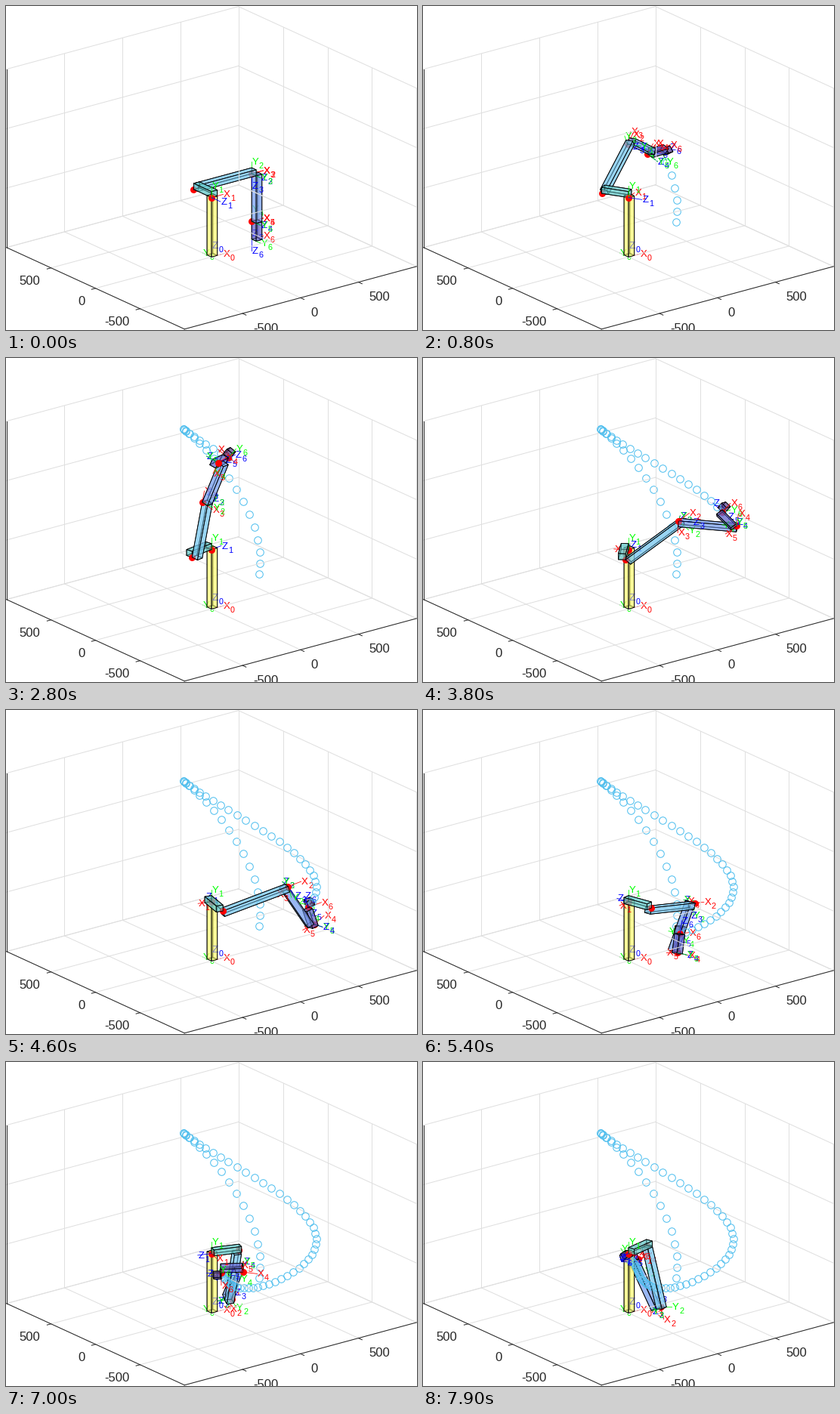
A matplotlib script for the animation above (8 s loop, 544 by 429 pixels).

```python
import colorsys
import itertools
import numpy as np
import matplotlib.pyplot as plt
from matplotlib.animation import FuncAnimation
from matplotlib.patches import Polygon

W, H, DPI = 544, 429, 100
PX = 72 / DPI                      # points per pixel
STEPS, STEP = 80, np.radians(3.6)  # every joint turns by the same angle
FONT = "Liberation Sans"
INK, GRID = "#262626", "#dfdfdf"
COLORS = ["#ff0000", "#00ff00", "#0000ff"]

# Affine view from azimuth -37.5 degrees: pixels and nearness per mm
AZ, TILT, SCALE, RISE = np.radians(37.5), 0.352, 0.1935, 0.1574
C, S = SCALE * np.cos(AZ), SCALE * np.sin(AZ)
VIEW = np.array([[C, -S, 0], [-TILT * S, -TILT * C, -RISE]])
NEAR = np.array([-S, -C, TILT * RISE / (1 - TILT ** 2)])
ORIGIN = np.array([272.0, 332.3])

# Arm dimensions in mm
BASE, OFFSET, UPPER, FORE, TOOL, THICK = 500, 200, 500, 400, 150, 50
POINT_LIFT = 1.2                   # markers and text win over touching faces


def project(p):
    return ORIGIN + np.asarray(p, float) @ VIEW.T


def order(p):
    return 50 + 100 * float(np.mean(np.atleast_2d(p) @ NEAR))


def link(q, d=0, a=0, alpha=0):
    c, s = np.cos(q), np.sin(q)
    ca, sa = np.cos(np.radians(alpha)), np.sin(np.radians(alpha))
    return np.array([[c, -s * ca, s * sa, a * c],
                     [s, c * ca, -c * sa, a * s],
                     [0, sa, ca, d],
                     [0, 0, 0, 1]])


def pose(k):
    q = k * STEP
    chain = [link(q, d=BASE, alpha=90), link(q, d=-OFFSET, a=UPPER),
             link(q, alpha=90), link(q, d=FORE, alpha=-90),
             link(q, alpha=90), link(q, d=TOOL)]
    return list(itertools.accumulate(chain, np.matmul, initial=np.eye(4)))


def place(frame, p):
    return np.asarray(p, float) @ frame[:3, :3].T + frame[:3, 3]


def bar_faces(axis, length):
    """Six faces of a square bar running along one axis from its joint."""
    spans = [(0, THICK)] * 3
    spans[axis] = (0, length)
    faces = []
    for i in range(3):
        u, v = [j for j in range(3) if j != i]
        for end in spans[i]:
            quad = np.full((4, 3), float(end))
            quad[:, u] = [spans[u][m] for m in (0, 1, 1, 0)]
            quad[:, v] = [spans[v][m] for m in (0, 0, 1, 1)]
            faces.append(quad)
    return faces


def bar_color(i):
    if i == 0:
        return colorsys.hsv_to_rgb(1 / 6, 0.53, 1)
    return colorsys.hsv_to_rgb(0.445 + 0.055 * i, 0.5,
                               0.97 - 0.09 * abs(i - 2.5) ** 1.6)


fig = plt.figure(figsize=(W / DPI, H / DPI), dpi=DPI, facecolor="white")
ax = fig.add_axes([0, 0, 1, 1])
ax.set_xlim(0, W)
ax.set_ylim(H, 0)
ax.axis("off")


def segment(a, b, color, z):
    xy = project([a, b])
    ax.plot(xy[:, 0], xy[:, 1], color=color, lw=PX, zorder=z)


def tick(p, out, dx, dy, text):
    segment(p, np.add(p, out), INK, 2)
    x, y = project(p)
    ax.text(x + dx, y + dy, text, family=FONT, size=16.6 * PX, color=INK,
            ha="left" if dx > 0 else "right", va="center_baseline", zorder=2)


def draw_stage(R=1000, top=1500):
    for t in range(-R, R + 1, 500):
        segment((t, -R, 0), (t, R, 0), GRID, 1)
        segment((-R, t, 0), (R, t, 0), GRID, 1)
        segment((t, R, 0), (t, R, top), GRID, 1)
        segment((R, t, 0), (R, t, top), GRID, 1)
    for z in range(0, top + 1, 500):
        segment((-R, R, z), (R, R, z), GRID, 1)
        segment((R, -R, z), (R, R, z), GRID, 1)
    for end in ((R, -R, 0), (-R, R, 0)):
        segment((-R, -R, 0), end, INK, 2)
    segment((-R, R, 0), (-R, R, top), INK, 2)
    for t in (-500, 0, 500):
        tick((t, -R, 0), (0, -40, 0), 14, 18.8, str(t))
        tick((-R, t, 0), (-34, 0, 0), -14, 16, str(t))


draw_stage()

# Each bar: frame, axis, signed length
BARS = [(0, 2, BASE), (1, 2, -OFFSET), (2, 0, -UPPER),
        (3, 2, FORE), (5, 2, TOOL), (6, 2, THICK)]
faces = []
for i, (n, axis, length) in enumerate(BARS):
    for quad in bar_faces(axis, length):
        patch = ax.add_patch(Polygon([(0, 0)] * 4, closed=True, lw=0.85 * PX,
                                     fc=(*bar_color(i), 0.5), ec="black",
                                     joinstyle="round"))
        faces.append((n, quad, patch))

joints = [(n, (0, 0, 0)) for n in (1, 2, 4, 6)] + [(2, (-UPPER, 0, 0))]
dots = [ax.plot([], [], "o", ms=9 * PX, mfc="red", mec="none")[0]
        for _ in joints]

axes = list(itertools.product(range(7), range(3)))
rods = [ax.plot([], [], color=COLORS[i], lw=0.8 * PX)[0] for _, i in axes]


def label(s, size, color):
    return ax.text(0, 0, s, family=FONT, size=size * PX, color=color,
                   ha="left", va="baseline")


names = [(label("XYZ"[i], 13.3, COLORS[i]), label(str(n), 10.8, COLORS[i]))
         for n, i in axes]

rings = []
for k in range(STEPS):
    tip = pose(k)[6][:3, 3]
    x, y = project(tip)
    rings.append(ax.plot([x], [y], "o", ms=9.6 * PX, mfc="none",
                         mec="#4dbeee", mew=PX, zorder=order(tip))[0])


def update(k):
    frames = pose(k)
    for n, quad, patch in faces:
        pts = place(frames[n], quad)
        patch.set_xy(project(pts))
        patch.set_zorder(order(pts))
        patch.set_visible(n < 6 or k > 0)
    for (n, p), dot in zip(joints, dots):
        pt = place(frames[n], p)
        x, y = project(pt)
        dot.set_data([x], [y])
        dot.set_zorder(order(pt) + POINT_LIFT)
        dot.set_visible(n < 6 or k > 0)
    for (n, i), rod, (big, small) in zip(axes, rods, names):
        start = frames[n][:3, 3]
        end = start + 100 * frames[n][:3, i]
        xy = project([start, end])
        rod.set_data(xy[:, 0], xy[:, 1])
        rod.set_zorder(order([start, end]))
        x, y = xy[1]
        big.set_position((x + 0.5, y + 4))
        small.set_position((x + 9.4, y + 9))
        for t in (big, small):
            t.set_zorder(order(end) + POINT_LIFT)
    for i, ring in enumerate(rings):
        ring.set_visible(2 <= i <= k)
    return []


anim = FuncAnimation(fig, update, frames=STEPS, init_func=lambda: update(0),
                     interval=100, repeat=True, repeat_delay=0, blit=False)
plt.show()
```
